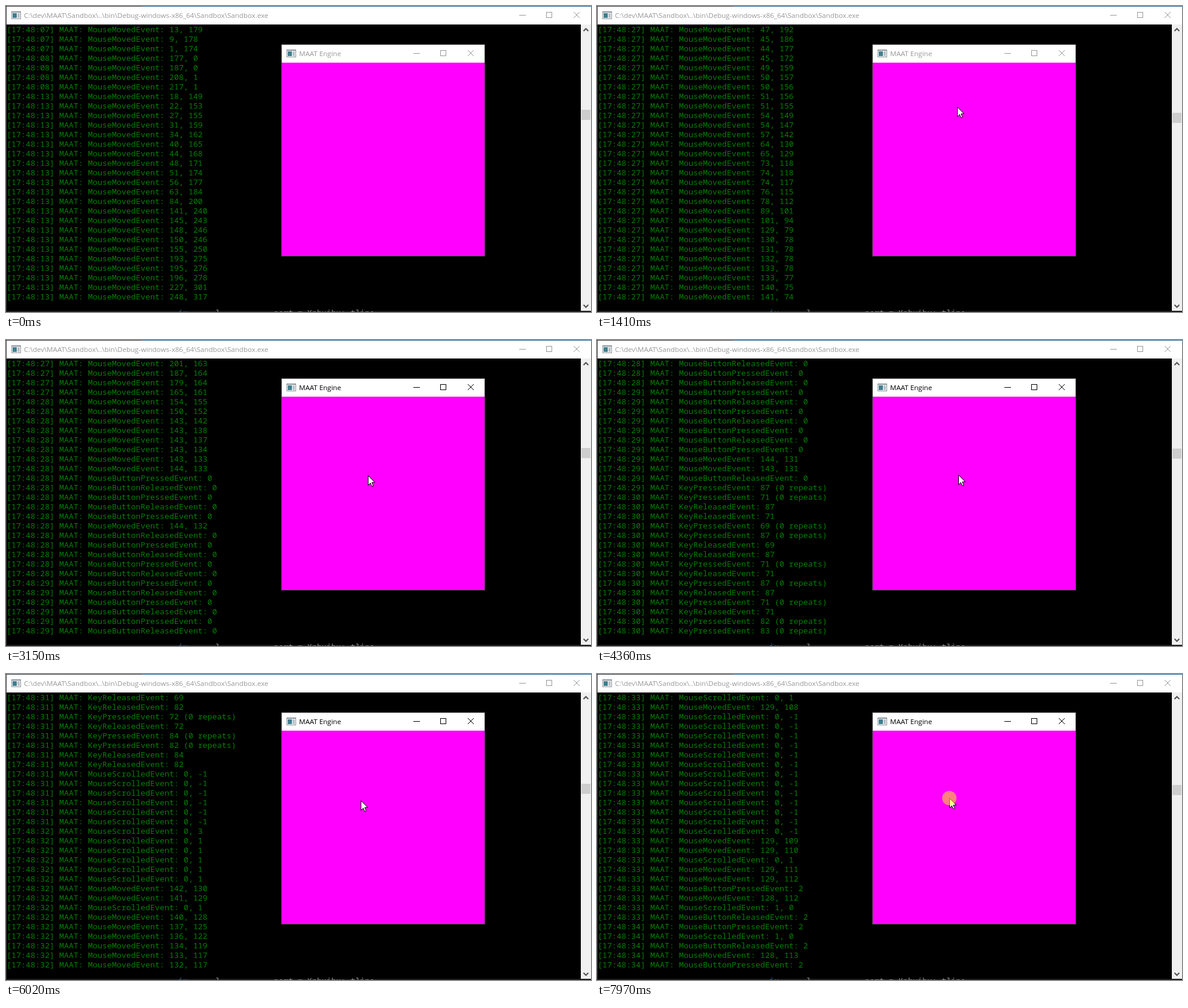
Animation of 978x513 px, one loop 8000 ms. Source, as an HTML page with a canvas:

```html
<!DOCTYPE html>
<html lang="en">
<head>
<meta charset="utf-8">
<title>Event log</title>
<style>
html, body { margin: 0; width: 100%; height: 100%; overflow: hidden; background: #000; }
canvas { display: block; }
</style>
</head>
<body>
<canvas id="stage" width="978" height="513"></canvas>
<script>
const ctx = document.getElementById('stage').getContext('2d');
const LOOP = 8000, ROWS = 29, ROW_H = 16;
const CLIENT = { x: 461, y: 95, w: 339, h: 324 };
const MONO = '13.333px "Noto Sans Mono", "DejaVu Sans Mono", monospace';
const UI = '11.6px "Open Sans", "Noto Sans", sans-serif';

// Mouse moves along a cubic curve, without its starting point.
function curve(n, ...p) {
  const at = (k, u) => {
    const v = 1 - u;
    return Math.round(v * v * v * p[0][k] + 3 * v * v * u * p[1][k] + 3 * v * u * u * p[2][k] + u * u * u * p[3][k]);
  };
  return Array.from({ length: n }, (_, i) => `M${at(0, (i + 1) / n)},${at(1, (i + 1) / n)}`).join(' ');
}

// Tokens: @ second, M move, S scroll, P/R button, K/U key; "*n" repeats.
const history = '@07 M13,179 M9,178 M1,174 @08 M177,0 M187,0 M208,1 M217,1 ' +
  '@13 M18,149 M22,153 M27,155 M31,159 M34,162 M40,165 M44,168 M48,171 M51,174 M56,177 M63,184 M84,200 ' +
  'M141,240 M145,243 M148,246 M150,246 M155,250 M193,275 M195,276 M196,278 M227,301 M248,317';

// Bursts: first change, last change, number of steps, tokens.
const bursts = [
  [80, 850, 16, '@26 ' + curve(56, [236, 323], [180, 262], [132, 248], [79, 210])],
  [900, 1405, 12, '@27 ' + curve(15, [79, 210], [68, 205], [52, 203], [47, 194]) +
    ' M47,192 M45,186 M44,177 M45,172 M49,159 M50,157 M50,156 M51,156 M51,155 M54,149 M54,147 M57,142' +
    ' M64,130 M65,129 M73,118 M74,118 M74,117 M76,115 M78,112 M89,101 M101,94 M129,79 M130,78 M131,78' +
    ' M132,78 M133,78 M133,77 M140,75 M141,74'],
  [1460, 1690, 6, curve(16, [141, 74], [195, 62], [245, 120], [217, 157])],
  [1720, 1920, 5, 'M201,163 M187,164 M179,164 M165,161 @28 M154,155 M150,152 M143,142 M143,138 M143,137 M143,134'],
  [2100, 2840, 17, 'M143,133 M144,133 P0 R0 P0 R0 P0 M144,132 R0 P0 R0 P0 R0'],
  [2920, 3150, 6, '@29 P0 R0 P0 R0 P0 R0'],
  [3310, 3390, 3, 'P0 M144,131 M143,131 R0'],
  [3720, 4360, 10, 'K87 @30 K71 U87 U71 K69 K87 U69 U87 K71 U71 K87 U87 K71 U71 K82 K83'],
  [4410, 4460, 2, 'U82 U83'],
  [4540, 4820, 4, 'K72 U72 K69 K82'],
  [5000, 5230, 4, '@31 U69 U82 K72 U72 K84 K82 U84 U82'],
  [5410, 5610, 5, 'S0,-1*6'],
  [5790, 6020, 6, '@32 S0,3 S0,1*5 M142,130 M141,129 S0,1 M140,128 M137,125 M136,122 M134,119 M133,117 M132,117'],
  [6120, 6250, 4, 'S0,-1*6 S0,-2 S0,-1*2'],
  [6430, 6760, 8, 'S0,1*2 S0,2*2 S0,1*3 @33 M129,110 M129,109 S0,1 M129,108'],
  [6940, 7060, 4, 'S0,-1*5'],
  [7080, 7660, 10, 'S0,-1*8 M129,109 M129,110 S0,1 M129,111 M129,112 P2 M128,112 S1,0 R2'],
  [7790, 7970, 5, '@34 P2 S1,0 R2 M128,113 P2']
];

const NAMES = {
  M: 'MouseMoved', S: 'MouseScrolled', P: 'MouseButtonPressed',
  R: 'MouseButtonReleased', K: 'KeyPressed', U: 'KeyReleased'
};
const log = [];
let second = '07';

function addBurst(start, end, steps, text) {
  const items = [];
  for (const token of text.split(' ')) {
    if (token[0] === '@') { second = token.slice(1); continue; }
    const [body, times = 1] = token.split('*');
    const kind = body[0], value = body.slice(1);
    const tail = value.replace(',', ', ') + (kind === 'K' ? ' (0 repeats)' : '');
    const line = `[17:48:${second}] MAAT: ${NAMES[kind]}Event: ${tail}`;
    for (let i = 0; i < times; i++) items.push({ kind, value, line });
  }
  const gap = steps > 1 ? (end - start) / (steps - 1) : 0;
  items.forEach((item, i) => {
    item.time = start + Math.floor(i * steps / items.length) * gap;
    log.push(item);
  });
}
addBurst(-1, -1, 1, history);
bursts.forEach(b => addBurst(...b));

function rect(color, x, y, w, h) {
  ctx.fillStyle = color;
  ctx.fillRect(x, y, w, h);
}

function label(text, x, y, font, color) {
  ctx.font = font;
  ctx.fillStyle = color;
  ctx.fillText(text, x, y);
}

function stroke(color, width, ...lines) {
  ctx.strokeStyle = color;
  ctx.lineWidth = width;
  ctx.beginPath();
  for (const pts of lines) pts.forEach(([x, y], i) => i ? ctx.lineTo(x, y) : ctx.moveTo(x, y));
  ctx.stroke();
}

function titleBar(x, y, w, title, color, minX, pitch) {
  rect('#fff', x, y, w, 30);
  rect('#8b9299', x + 8, y + 8, 16, 13);
  rect('#fff', x + 9, y + 10, 14, 10);
  rect('#3f7f8f', x + 10, y + 11, 7, 8);
  rect('#b9c3ca', x + 18, y + 11, 4, 8);
  label(title, x + 29, y + 19, UI, color);
  const cy = y + 14;
  rect(color, minX, cy, 11, 1);
  ctx.strokeStyle = color;
  ctx.lineWidth = 1;
  ctx.strokeRect(minX + pitch + 0.5, cy - 4.5, 9, 9);
  const cx = minX + pitch * 2 + 1;
  stroke(color, 1, [[cx, cy - 5], [cx + 10, cy + 5]], [[cx + 10, cy - 5], [cx, cy + 5]]);
}

function scrollBar(added) {
  rect('#f0f0f0', 961, 31, 17, 480);
  rect('#cdcdcd', 962, Math.floor(174 + added / 20), 15, 17);
  const chevron = (y, d) => stroke('#505050', 2, [[965.5, y + d], [969.5, y - d], [973.5, y + d]]);
  chevron(40, 2);
  chevron(503, -2);
}

// The sliver of an editor window behind the console.
function backdrop() {
  rect('#1e1e1e', 0, 511, 978, 2);
  ctx.save();
  ctx.beginPath();
  ctx.rect(280, 509, 400, 4);
  ctx.clip();
  label('ix', 288, 519, MONO, '#397ab0');
  label('l', 350, 519, MONO, '#8a8f94');
  label('port m Kphuibx: tline', 448, 519, MONO, '#8a8f94');
  ctx.restore();
}

function pointer(x, y, down) {
  const shape = [[0.5, 0.5], [0.5, 16.5], [4.2, 12.9], [6.8, 18.5], [9.2, 17.5], [6.7, 11.9], [11.6, 11.7]];
  ctx.beginPath();
  shape.forEach(([dx, dy]) => ctx.lineTo(x + dx, y + dy));
  ctx.closePath();
  ctx.fillStyle = '#fff';
  ctx.fill();
  ctx.strokeStyle = '#000';
  ctx.lineWidth = 1;
  ctx.stroke();
  if (down) {
    ctx.fillStyle = 'rgba(255,255,0,0.5)';
    ctx.beginPath();
    ctx.arc(x, y, 12, 0, Math.PI * 2);
    ctx.fill();
  }
}

function draw(t) {
  const seen = log.filter(e => e.time <= t + 0.01);
  const fresh = seen.slice(ROWS);
  const last = kinds => fresh.filter(e => kinds.includes(e.kind)).pop();
  const move = last('M'), button = last('PR');

  rect('#000', 0, 0, 978, 513);
  rect('#3a3a3a', 0, 0, 1, 513);
  rect('#33383d', 0, 0, 227, 1);
  rect('#1f5a86', 227, 0, 751, 1);
  titleBar(1, 1, 977, 'C:\\dev\\MAAT\\Sandbox\\..\\bin\\Debug-windows-x86_64\\Sandbox\\Sandbox.exe', '#999', 858, 45.5 | 0);
  seen.slice(-ROWS).forEach((e, i) => label(e.line, 1, 44 + i * ROW_H, MONO, '#008000'));
  scrollBar(fresh.length);
  backdrop();

  rect('#3c3c3c', CLIENT.x - 1, 64, CLIENT.w + 2, 356);
  titleBar(CLIENT.x, 65, CLIENT.w, 'MAAT Engine', button ? '#000' : '#999', 681, 45);
  rect('#f0f', CLIENT.x, CLIENT.y, CLIENT.w, CLIENT.h);
  if (move) {
    const [x, y] = move.value.split(',').map(Number);
    pointer(CLIENT.x + x, CLIENT.y + y, button && button.kind === 'P');
  }
}

const begin = performance.now();
function tick() {
  draw((performance.now() - begin) % LOOP);
  requestAnimationFrame(tick);
}
tick();
</script>
</body>
</html>
```
